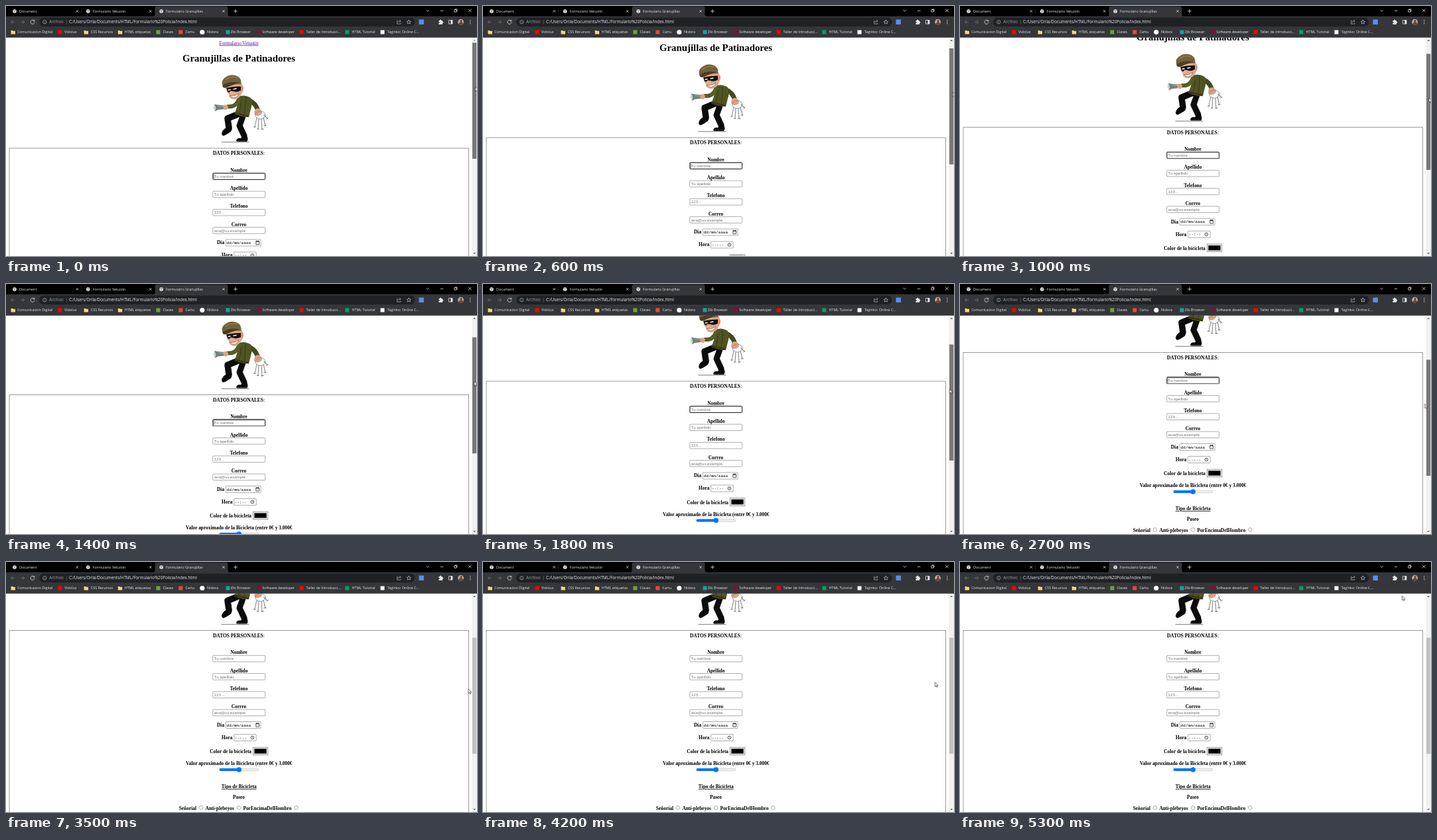
Animation, 710 px wide and 378 px high, one loop 5.4 s. Source, as an HTML page:

```html
<!DOCTYPE html>
<html lang="es">
<head>
<meta charset="utf-8">
<title>Formulario Granujillas</title>
<style>
@property --scroll { syntax: "<number>"; inherits: true; initial-value: 0; }
html, body { margin: 0; width: 100%; height: 100%; overflow: hidden; background: #fff; }
svg { display: block; animation: scroll 5.4s infinite; }

.ui { font: 5.4px "Open Sans", "Noto Sans", sans-serif; fill: #e8eaed; }
.url { font-size: 6.2px; }
.dim { fill: #9aa0a6; }
.line { fill: none; stroke: #dfe1e5; stroke-width: .8; }
.page { font: bold 7.4px "Liberation Serif", serif; }
.mid { text-anchor: middle; }
.hint { font: 6.16px "Liberation Sans", sans-serif; fill: #757575; }
.mono { font: 6.1px "Liberation Mono", monospace; }
.box { fill: #fff; stroke: #767676; stroke-width: .6; }

.page { transform: translateY(calc(var(--scroll) * -1px)); }
.thumb { transform: translateY(calc(var(--scroll) * .529px)); animation: release 5.4s step-end infinite; }
.focus { animation: blur 5.4s step-end infinite; }
.caret { animation: blink 1.08s step-end infinite; }
.up { animation: arrow 5.4s step-end infinite; }
.cursor { animation: move 5.4s infinite; }

/* one step every 100 ms */
@keyframes scroll {
  0% { --scroll: 0; animation-timing-function: steps(6); }
  11.1111% { --scroll: 16; animation-timing-function: steps(8); }
  25.9259% { --scroll: 47.5; animation-timing-function: steps(4); }
  33.3333% { --scroll: 68; animation-timing-function: steps(9); }
  50%, 100% { --scroll: 111.5; }
}
@keyframes move {
  0% { transform: translate(707.8px, 122.5px); animation-timing-function: steps(6); }
  11.1111% { transform: translate(708.3px, 130.5px); animation-timing-function: steps(8); }
  25.9259% { transform: translate(705.8px, 147.3px); animation-timing-function: steps(4); }
  33.3333% { transform: translate(703.3px, 158.8px); animation-timing-function: steps(9); }
  50% { transform: translate(700.5px, 181.3px); animation-timing-function: steps(6); }
  61.1111% { transform: translate(699px, 191px); animation-timing-function: step-end; }
  64.8148% { transform: translate(697px, 192px); animation-timing-function: step-end; }
  66.6667% { transform: translate(695px, 193px); animation-timing-function: step-end; }
  70.3704%, 72.2222% { transform: translate(694.5px, 194px); animation-timing-function: steps(3); }
  77.7778% { transform: translate(681.3px, 182px); animation-timing-function: steps(3); }
  83.3333% { transform: translate(660px, 69px); animation-timing-function: steps(3); }
  88.8889%, 90.7407% { transform: translate(657px, 49px); animation-timing-function: steps(4); }
  98.1481%, 100% { transform: translate(666.5px, 51.3px); animation-timing-function: step-end; }
}
@keyframes release { 0% { fill: #787878; } 53.7037%, 100% { fill: #c1c1c1; } }
@keyframes blur { 0% { opacity: 1; } 53.7037%, 100% { opacity: 0; } }
@keyframes blink { 0% { opacity: 1; } 58%, 100% { opacity: 0; } }
@keyframes arrow { 0% { fill: #a3a3a3; } 1.85185%, 100% { fill: #505050; } }
</style>
</head>
<body>
<svg width="710" height="378" viewBox="0 0 710 378">
  <defs>
    <clipPath id="view"><path d="M0 47.5H702V378H0z"/></clipPath>
    <g id="globe">
      <circle r="2.9" fill="#e8eaed"/>
      <path d="M-2.3-.8Q-.8-1.4 0-.3T-.6 2.1M.6-2.3Q.2-1 2.2-.6" fill="none" stroke="#303134" stroke-width=".6"/>
    </g>
    <path id="x" class="line" d="M-1.7-1.7 1.7 1.7M1.7-1.7-1.7 1.7"/>
    <path id="folder" d="M0-2.6H2.5L3.3-1.8H6.4V3H0z" fill="#f8d775"/>
    <rect id="badge" y="36.5" width="6" height="6"/>
    <rect id="field" class="box" x="311.8" width="78.8" height="9.6" rx=".9"/>
    <circle id="radio" class="box" r="2.8"/>
  </defs>

  <rect width="710" height="378" fill="#fff"/>

  <g clip-path="url(#view)">
    <g class="page">
      <text class="mid" x="351" y="58.5" style="font-weight:400" fill="#551a8b" text-decoration="underline">Formulario Vetustin</text>
      <text class="mid" x="351" y="84" style="font-size:14.8px">Granujillas de Patinadores</text>

      <g id="thief" stroke-linecap="round" stroke-linejoin="round">
        <path d="M325 205.8H366" stroke="#777" stroke-width="1"/>
        <!-- legs and shoes -->
        <path d="M358 164 352 181 359 196" fill="none" stroke="#0c0c0c" stroke-width="9"/>
        <path d="M351 163 334 170 336 184" fill="none" stroke="#0c0c0c" stroke-width="9.5"/>
        <path d="M325 193Q326 187 332 184L340 183Q342 189 336 192L331 195Q326 198 325 193z" fill="#080808"/>
        <path d="M347 204Q348 199 354 200L358 194 363 196Q366 202 363 205H349z" fill="#080808"/>
        <path d="M349 203.7H362" fill="none" stroke="#555" stroke-width=".6"/>
        <!-- far arm, jacket, near arm -->
        <path d="M367 143Q376 147 379 156" fill="none" stroke="#434a1d" stroke-width="7"/>
        <path d="M350 137Q360 133 369 139Q372 147 369 156L366 168Q355 168 344 163Q350 152 350 137z" fill="#4f5423"/>
        <path d="M353 140Q356 150 351 162M361 139Q361 154 359 165" fill="none" stroke="#343a17" stroke-width="1"/>
        <path d="M351 141Q347 153 335 152" fill="none" stroke="#575c29" stroke-width="6"/>
        <path d="M345 162 365 166.5" stroke="#3d2d1e" stroke-width="2"/>
        <!-- torch -->
        <path d="M314 148.5 319 149.5 334 151 333 155.5 319 157 315 159.5z" fill="#6f8178"/>
        <path d="M314 148.5Q318 154 315 159.5Q311.5 154 314 148.5z" fill="#c5d3ca"/>
        <path d="M320 151.5 331 152.5" stroke="#9fb1a8" stroke-width="1"/>
        <path d="M328 150Q333 148 335 152Q335 157 330 157Q326 155 328 150z" fill="#d9a184"/>
        <!-- hand and keys -->
        <path d="M375 157Q380 152 385 158Q388 162 383 165Q377 168 374 163z" fill="#dba283"/>
        <g fill="none" stroke="#888" stroke-width=".9">
          <ellipse cx="383.5" cy="165" rx="7.5" ry="6"/>
          <path d="M378 169 375 183M381 171 380 186M385 171 386 187M388 169 391 181M389 165 394 170" stroke-width="1.1"/>
          <path d="M373.5 183H376M378.5 186H381M385 186H388M389 181H392M393 171 395 169" stroke="#666"/>
        </g>
        <!-- head -->
        <g transform="rotate(-9 344 122)">
          <path d="M333 119Q330 127 334 132Q333 139 341 141Q350 141 355 132Q360 126 355 118z" fill="#dfa98b"/>
          <path d="M353 124Q359 121 357 128Q355 132 352 130z" fill="#d3967a"/>
          <path d="M332 122Q341 121 354 123L353 129Q346 132 341 128Q337 131 333 128z" fill="#111"/>
          <path d="M334.5 125.5H337.5M342.5 125.5H346.5" stroke="#fff" stroke-width="1.5"/>
          <path d="M338 127Q333 131 337 133Q341 133 341 129z" fill="#e5b095"/>
          <path d="M336 134.5Q342 137 349 133Q347 138.5 341 138.5Q337 138 336 134.5z" fill="#fff" stroke="#814c3d" stroke-width=".6"/>
          <path d="M327 117Q325 111 332 106.5Q342 101 351 107Q357 111 355 120Q343 117 332 121.5Q328 121 327 117z" fill="#75613c"/>
          <path d="M327 117Q338 112 353 117Q344 118 332 121.5Q326 122 327 117z" fill="#4c3d24"/>
          <path d="M333 109.5Q342 105 350 109" fill="none" stroke="#94815a" stroke-width="1.3"/>
        </g>
      </g>

      <rect x="5" y="215" width="692.6" height="600" fill="none" stroke="#777" stroke-width=".75"/>
      <text class="mid" x="351" y="225.4">DATOS PERSONALES<tspan font-weight="400">:</tspan></text>

      <text class="mid" x="351" y="250.8">Nombre</text>
      <use href="#field" y="252.8"/>
      <g class="focus">
        <rect x="311.9" y="252.8" width="78.6" height="9.6" rx=".9" fill="none" stroke="#1c1c1c" stroke-width="1"/>
        <path class="caret" d="M313.6 254.4V261" stroke="#000" stroke-width=".5"/>
      </g>
      <text class="hint" x="313.6" y="259.7">Tu nombre</text>
      <text class="mid" x="351" y="278.1">Apellido</text>
      <use href="#field" y="280.1"/>
      <text class="hint" x="313.6" y="287">Tu apellido</text>
      <text class="mid" x="351" y="305.4">Telefono</text>
      <use href="#field" y="307.4"/>
      <text class="hint" x="313.6" y="314.3">123...</text>
      <text class="mid" x="351" y="332.6">Correo</text>
      <use href="#field" y="334.6"/>
      <text class="hint" x="313.6" y="341.5">ana@uv.example</text>

      <text x="318" y="360.3">Dia</text>
      <rect class="box" x="331.3" y="353" width="52.8" height="10" rx=".9"/>
      <text class="mono" x="332.6" y="360">dd/mm/aaaa</text>
      <path d="M376.8 355.6H381.6V360.6H376.8z" fill="none" stroke="#111" stroke-width=".7"/>
      <path d="M376.8 356.2H381.6M378 354.8V356M380.4 354.8V356" stroke="#111" stroke-width=".8"/>

      <text x="325" y="379.3">Hora</text>
      <rect class="box" x="343.6" y="372" width="33.6" height="10" rx=".9"/>
      <text class="mono" x="344.8" y="379">--:--</text>
      <circle cx="371.4" cy="377" r="2.4" fill="none" stroke="#111" stroke-width=".7"/>
      <path d="M371.4 375.5V377.2L372.5 378" fill="none" stroke="#111" stroke-width=".6"/>

      <text x="307.2" y="400.8">Color de la bicicleta</text>
      <rect x="372.3" y="391.7" width="22.5" height="11.6" fill="#efefef" stroke="#767676" stroke-width=".7"/>
      <rect x="374.3" y="393.8" width="18.5" height="7.4" fill="#000" stroke="#777" stroke-width=".4"/>

      <text class="mid" x="351.3" y="418.8">Valor aproximado de la Bicicleta (entre 0€ y 3.000€</text>
      <rect x="321.8" y="423.8" width="59" height="3.5" rx="1.75" fill="#efefef" stroke="#b2b2b2" stroke-width=".5"/>
      <rect x="321.6" y="423.6" width="29.5" height="3.9" rx="1.9" fill="#0075ff"/>
      <circle cx="351.3" cy="425.5" r="3.7" fill="#0075ff"/>

      <text class="mid" x="351.2" y="453.6" text-decoration="underline">Tipo de Bicicleta</text>
      <text class="mid" x="351" y="469.5">Paseo</text>
      <text x="260.7" y="486">Señorial</text>
      <use href="#radio" x="294" y="483"/>
      <text x="300.4" y="486">Anti-plebeyos</text>
      <use href="#radio" x="351" y="483"/>
      <text x="357.4" y="486">PorEncimaDelHombro</text>
      <use href="#radio" x="437.3" y="483"/>
    </g>
  </g>

  <!-- scrollbar -->
  <path d="M702.2 47.5H710V378H702.2z" fill="#f1f1f1"/>
  <rect class="thumb" x="703" y="55.5" width="6.2" height="175.5"/>
  <path class="up" d="M704.2 53 706.1 51 708 53z"/>
  <path d="M704.2 373.2 706.1 375.2 708 373.2z" fill="#505050"/>

  <!-- browser window -->
  <g class="ui">
    <path d="M0 0H710V16H0z" fill="#000"/>
    <path d="M0 15.5H222Q224.5 15.5 224.5 12.5V3.5Q224.5 .5 227.5 .5H331.5Q334.5 .5 334.5 3.5V12.5Q334.5 15.5 337 15.5H710V47.7H0z" fill="#35363a"/>
    <rect x="50" y="17.5" width="566.5" height="13.5" rx="6.7" fill="#202124"/>
    <path d="M113.5 4.5V11.5" stroke="#444" stroke-width=".5"/>

    <use href="#globe" x="13" y="7.8"/><text x="20" y="9.8">Document</text><use href="#x" x="107.3" y="7.8"/>
    <use href="#globe" x="123.7" y="7.8"/><text x="130.8" y="9.8">Formulario Vetustin</text><use href="#x" x="217.7" y="7.8"/>
    <use href="#globe" x="234.2" y="7.8"/><text x="241" y="9.8">Formulario Granujillas</text><use href="#x" x="328" y="7.8"/>
    <path class="line" d="M343.2 7.8H348.8M346 5V10.6M633.4 6 635.6 8.2 637.8 6M654.8 7.2H659.4M675.8 5.8H679V9H675.8zM676.8 5.8V4.8H680V8H679M697 4.6 701.6 9.2M701.6 4.6 697 9.2"/>

    <path class="line" d="M13 24.2H7.5M10 21.5 7.3 24.2 10 26.9M22 24.2H27.5M25 21.5 27.7 24.2 25 26.9" style="stroke:#77797d"/>
    <path class="line" d="M42.3 22.3A3 3 0 1 0 43 24.7M42.9 20.8V22.9H40.7"/>
    <circle class="line" cx="58.3" cy="24.2" r="2.7" style="stroke:#9aa0a6"/>
    <path d="M58.3 23.7V25.8M58.3 22.4V23" stroke="#9aa0a6" stroke-width=".7"/>
    <text class="url dim" x="65.3" y="26.4">Archivo</text>
    <path d="M91.2 20.8V27.6" stroke="#777" stroke-width=".6"/>
    <text class="url" x="95" y="26.4">C:/Users/Orila/Documents/HTML/Formulario%20Policia/index.html</text>
    <path class="line" d="M591 22.2H589.6V27H595V25.4M591 25Q591.3 22.6 595 22.6M593.4 21 595.2 22.6 593.4 24.2" style="stroke:#b5b8bd;stroke-width:.7"/>
    <path class="line" d="M607.3 20.9 608.2 23.1 610.5 23.3 608.8 24.8 609.3 27 607.3 25.8 605.3 27 605.8 24.8 604.1 23.3 606.4 23.1z" style="stroke-width:.6"/>
    <rect x="622.5" y="20.5" width="7.4" height="7.4" fill="#5b8def"/>
    <path d="M652.3 22H654Q653.8 20.4 655.1 20.4T656.2 22H658V23.9Q659.4 23.7 659.4 24.8T658 25.9V27.7H652.3V25.8Q653.8 25.9 653.8 24.7T652.3 23.7z"/>
    <path class="line" d="M667.4 21.5H673V27H667.4z"/>
    <path d="M670.4 21.5H673V27H670.4z"/>
    <circle cx="685.6" cy="24.2" r="4.4" fill="#b9a7a0"/>
    <path d="M682.4 27.2Q682.8 25 685 24.6Q683.8 21 686 20.8T687.2 24.6Q689 25 689 27A4.4 4.4 0 0 1 682.4 27.2z" fill="#6d453c"/>
    <path d="M699.7 21.6V21.7M699.7 24.1V24.2M699.7 26.6V26.7" stroke="#e8eaed" stroke-width="1.3" stroke-linecap="round"/>

    <!-- bookmarks -->
    <use href="#folder" x="7.5" y="39.5"/><text x="17.2" y="41.4">Comunicacion Digital</text>
    <use href="#badge" x="78.4" fill="#f00"/><text x="88" y="41.4">Vidolux</text>
    <use href="#folder" x="117.6" y="39.5"/><text x="127.8" y="41.4">CSS Recursos</text>
    <use href="#folder" x="168.8" y="39.5"/><text x="178.8" y="41.4">HTML etiquetas</text>
    <use href="#badge" x="226.4" fill="#6fa33a"/><text x="236.4" y="41.4">Clases</text>
    <use href="#badge" x="260.3" fill="#e34a3b"/><text x="270.4" y="41.4">Cartu</text>
    <circle cx="295.8" cy="39.5" r="3.6" fill="#fff"/><text x="303" y="41.4">Nidora</text>
    <use href="#badge" x="331.5" fill="#17a398"/><text x="338.8" y="41.4">Zib Browser</text>
    <use href="#badge" x="378.4" fill="#7c1230"/><text x="386.3" y="41.4">Software developer</text>
    <use href="#badge" x="442.6" fill="#f00"/><text x="452.5" y="41.4">Taller de Introducci...</text>
    <use href="#badge" x="511.3" fill="#04a35e"/><text x="521.5" y="41.4">HTML Tutorial</text>
    <use href="#badge" x="564.5" fill="#fff"/><text x="574.8" y="41.4">TagInko: Online C...</text>
  </g>

  <path class="cursor" d="M0 0V6.4L1.5 5.1 2.6 7.4 3.7 6.9 2.7 4.7H4.6z" fill="#fff" stroke="#111" stroke-width=".6"/>
</svg>
</body>
</html>
```
